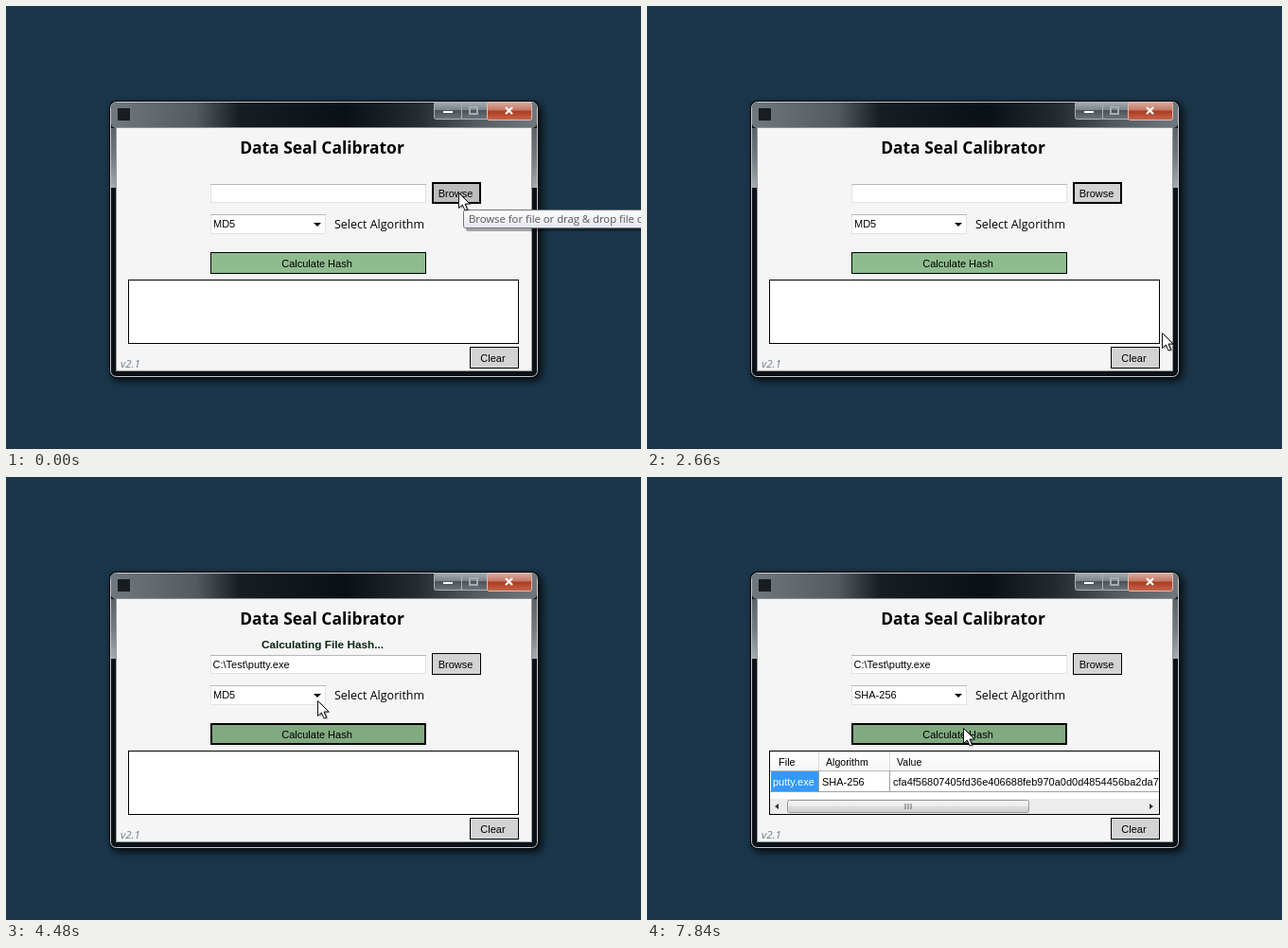
Recreate the animation shown at these times as an HTML page. Size 671 by 468 pixels, loop 8000 ms.

```html
<!DOCTYPE html>
<html lang="en">
<head>
<meta charset="utf-8">
<title>Checksum tool demo</title>
<style>
html, body { margin: 0; width: 100%; height: 100%; overflow: hidden; background: #1b364b; }
svg { display: block; width: 671px; height: 468px; }
text { font: 11px "Liberation Sans", Arial, sans-serif; fill: #000; white-space: pre; }
.ui { font: 11.3px "Open Sans", "Noto Sans", sans-serif; }
.label { font: 12.5px "Open Sans", "Noto Sans", sans-serif; }
.title { font: bold 17.4px "Open Sans", "Noto Sans", sans-serif; }
.status { font-weight: bold; font-size: 11.8px; fill: #07260f; }
.version { font: italic 11.5px "Open Sans", "Noto Sans", sans-serif; fill: #708090; }
.small { font-size: 10.6px; }
.tip { fill: #575757; }
.white { fill: #fff; }
.mid { text-anchor: middle; }
.end { text-anchor: end; }
.window { filter: drop-shadow(3px 3px 4px rgba(0,0,0,.85)); }
.glow { filter: blur(5px); }
</style>
</head>
<body>
<svg id="stage" viewBox="0 0 671 468" xmlns="http://www.w3.org/2000/svg"></svg>
<script>
const LOOP = 8000, STEP = 70;
const stage = document.getElementById('stage');

// Drawing helpers: boxes have their border inside the given size.
const rect = (x, y, w, h, fill, extra = '') =>
  `<rect x="${x}" y="${y}" width="${w}" height="${h}" fill="${fill}" ${extra}/>`;
const box = (x, y, w, h, fill, stroke, line = 1, r = 0, extra = '') =>
  rect(x + line / 2, y + line / 2, w - line, h - line, fill,
    `stroke="${stroke}" stroke-width="${line}" rx="${r}" ${extra}`);
const path = (d, fill, extra = '') => `<path d="${d}" fill="${fill}" ${extra}/>`;
const text = (x, y, s, cls = '') => `<text x="${x}" y="${y}" class="${cls}">${s}</text>`;
const group = (id, body, extra = '') => `<g id="${id}" ${extra}>${body}</g>`;
const down = (x, y, r = 4) => path(`M${x - r} ${y}h${2 * r}l${-r} ${r}z`, '#000');
const clip = (id, x, y, w, h) => `<clipPath id="${id}">${rect(x, y, w, h, '#000', `id="${id}Rect"`)}</clipPath>`;
const gradient = (id, stops, sideways) =>
  `<linearGradient id="${id}" x2="${sideways ? 1 : 0}" y2="${sideways ? 0 : 1}">` +
  stops.map(([at, color]) => `<stop offset="${at}" stop-color="${color}"/>`).join('') + '</linearGradient>';

const field = (x, y, w, h) => box(x, y, w, h, '#fff', '#e0e2e8') + rect(x, y, w, 1, '#b4b8be');

function closeButton(x, y) {
  return box(x, y, 48, 20, 'url(#red)', '#d8bcb5', 1, 2) +
    path(`M${x + 20} ${y + 6}l7 7m0 -7l-7 7`, 'none', 'stroke="#fff" stroke-width="2.2"');
}

function frame(x, y, w, h, top, shine) {
  const sideHeight = shine - y - top;
  return rect(x - 1, y - 1, w + 2, h + 2, '#05090c', 'rx="7"') +
    box(x, y, w, h, '#0b1116', '#c3cacf', 1, 6) +
    rect(x + 1, y + 1, w - 2, top - 1, 'url(#glass)', 'rx="5"') +
    [x + 1, x + w - 6].map(sx => rect(sx, y + top, 5, sideHeight, 'url(#side)')).join('') +
    box(x + 6, y + top - 1, w - 12, h - top - 5, '#f5f5f5', '#8b959b');
}

function scrollbar(x, y, w, thumbX, thumbW) {
  const cy = y + 8, cx = thumbX + thumbW / 2;
  return rect(x, y, w, 16, '#ececec') +
    box(thumbX, y + 1, thumbW, 14, 'url(#grey)', '#989898', 1, 2) +
    path(`M${x + 9} ${cy - 3}v6l-4 -3zM${x + w - 10} ${cy - 3}v6l4 -3z`, '#333') +
    path(`M${cx - 3} ${cy - 3}v6m3 -6v6m3 -6v6`, 'none', 'stroke="#666"');
}

const dialogButton = (y, label) =>
  box(536, y, 73, 21, 'url(#grey)', '#707070', 1, 3) + text(571.5, y + 15, label, 'mid');

const screen = (x, y, w, h) =>
  path(`M${x} ${y + 2}l${w} -2v${h}l${-w} -2z`, 'url(#deep)', 'stroke="#c3ccd5" stroke-width="1.6"') +
  path(`M${x + w * .3} ${y + h}l${w * .4} 1l3 4h${-w * .7}z`, '#b4bdc4');
const folder = (x, y, w, h) =>
  path(`M${x} ${y}h${w * .4}l2 2h${w * .6 - 2}v${h - 2}h${-w}z`, 'url(#yellow)', 'stroke="#d3a83f" stroke-width=".7"');

const hash = {
  md5: '9bb6826905965c13be1c84cc0ff83f42',
  sha: 'cfa4f56807405fd36e406688feb970a0d0d4854456ba2da72'
};

function table(id, algorithm, value, wide) {
  const lines = wide ? [181, 256] : [181, 256, 447];
  return group(id,
    rect(130, 290, 411, 20, 'url(#head)') + rect(130, 310, 411, 1, '#b5b5b5') + rect(130, 332, 411, 1, '#a0a0a0') +
    lines.map(x => rect(x, 291, 1, 19, '#dcdcdc') + rect(x, 310, 1, 23, '#a0a0a0')).join('') +
    rect(131, 311, 50, 21, '#3399ff') +
    text(139, 305, 'File') + text(189, 305, 'Algorithm', 'small') + text(264, 305, 'Value', 'small') +
    text(133, 326, 'putty.exe', 'white') + text(185, 326, algorithm) + text(260, 326, value) +
    (wide ? scrollbar(130, 340, 411, 148, 256) : text(455, 305, 'Path') + text(450, 326, 'C:\\Test\\putty.exe')),
    'clip-path="url(#tableClip)"');
}

const algorithms = ['MD5', 'SHA1', 'SHA-256', 'SHA-512'];

const defs = '<defs>' +
  gradient('glass', [[0, '#70787d'], [.2, '#535b61'], [.3, '#171e23'], [.55, '#0a1014'], [.72, '#252c31'], [.86, '#555d63'], [1, '#70787d']], true) +
  gradient('side', [[0, '#5b6369'], [.5, '#737b80'], [1, '#a5acb0']]) +
  gradient('red', [[0, '#d9aea3'], [.45, '#c47763'], [.5, '#ac3a22'], [1, '#c8684b']]) +
  gradient('caption', [[0, '#a7adb2'], [.45, '#7d858b'], [.5, '#4b5359'], [1, '#6d757b']]) +
  gradient('grey', [[0, '#f3f3f3'], [.48, '#ebebeb'], [.52, '#dddddd'], [1, '#cfcfcf']]) +
  gradient('blue', [[0, '#eaf6fd'], [.48, '#d9f0fc'], [.52, '#bee6fd'], [1, '#a7d9f5']]) +
  gradient('head', [[0, '#fff'], [1, '#f5f6f8']]) +
  gradient('sorted', [[0, '#f2f9fc'], [1, '#e1f1f9']]) +
  gradient('hot', [[0, '#fafbfd'], [1, '#ebf3fd']]) +
  gradient('picked', [[0, '#e4f0fd'], [1, '#cbe1fc']]) +
  gradient('screen', [[0, '#1d5fb4'], [.6, '#3f9be6'], [1, '#86ccf4']]) +
  gradient('deep', [[0, '#12257c'], [.6, '#1f50bb'], [1, '#5d9ae6']]) +
  gradient('yellow', [[0, '#fbe9a4'], [1, '#f0c65a']]) +
  gradient('hint', [[0, '#fff'], [1, '#e4e5f0']]) +
  clip('tableClip', 130, 290, 411, 66) + clip('listClip', 161, 75, 449, 238) + clip('dropClip', 210, 241, 140, 60) +
  '</defs>';

const mainWindow = group('main',
  frame(110, 101, 452, 291, 28, 192) +
  rect(118, 108, 13, 13, '#1a1d20') +
  box(452, 101, 30, 19, 'url(#caption)', '#aab1b5', 1, 2) + box(481, 101, 28, 19, 'url(#caption)', '#aab1b5') +
  box(461, 110, 12, 4, '#fff', '#555') + box(489, 106, 10, 9, 'none', '#a5acb0', 2) +
  closeButton(508, 101) +
  text(334, 156, 'Data Seal Calibrator', 'title mid') +
  group('status', text(334.5, 181, 'Calculating File Hash...', 'status mid')) +
  field(216, 188, 228, 20) + group('filePath', text(218.5, 202, 'C:\\Test\\putty.exe')) +
  rect(450, 186, 52, 23, '#d3d3d3', 'id="browse"') + box(450, 186, 52, 23, 'none', '#000') +
  group('browseFocus', box(450, 186, 52, 23, 'none', '#000', 2)) + text(475, 202, 'Browse', 'mid') +
  field(216, 220, 122, 21) +
  group('arrowHot', box(321, 220, 17, 21, 'url(#blue)', '#3c7fb1', 1, 1)) +
  down(329, 229) +
  group('textHot', rect(218, 223, 25, 15, '#3399ff', 'id="textHotRect"')) +
  '<text id="choice" x="219" y="234"></text>' +
  text(347, 235, 'Select Algorithm', 'label') +
  rect(216, 260, 228, 23, '#8fbc8f', 'id="calc"') + box(216, 260, 228, 23, 'none', '#000') +
  group('calcFocus', box(216, 260, 228, 23, 'none', '#000', 2)) + text(328.5, 276, 'Calculate Hash', 'mid') +
  box(129, 289, 413, 68, '#fff', '#000') +
  table('tableMd5', 'MD5', hash.md5, false) + table('tableSha', 'SHA-256', hash.sha, true) +
  box(490, 360, 52, 23, '#d3d3d3', '#000') + text(514.5, 376, 'Clear', 'mid') +
  text(121, 382, 'v2.1', 'version'), 'class="window"');

const dropdown = group('drop',
  rect(219, 244, 122, 54, '#0004') + box(216, 241, 122, 54, '#fff', '#444') +
  rect(217, 242, 120, 13, '#3399ff', 'id="pick"') +
  algorithms.map((name, i) => text(219, 252 + 13 * i, name, 'item')).join(''),
  'clip-path="url(#dropClip)"');

const tooltip = group('tooltip',
  rect(486, 218, 190, 20, '#0005', 'rx="2"') + box(483, 215, 200, 20, 'url(#hint)', '#767676', 1, 2) +
  text(489, 229, 'Browse for file or drag &amp; drop file onto form', 'ui tip'));

const places =
  box(98, 83, 20, 22, '#e4ebf0', '#98a7b2', 1, 2) + path('M101 88h13m-13 4h13m-13 4h8', 'none', 'stroke="#6797bb"') +
  path('M95 103h20l6 8h-25z', '#c4d3dc', 'stroke="#8b9ba5"') +
  `<circle cx="116" cy="103" r="7.5" fill="#d8e7ee" stroke="#6f8c9d"/>` + path('M116 98v5h4', 'none', 'stroke="#356"') +
  box(94, 145, 31, 24, 'url(#screen)', '#9eb7c9', 1, 1) + rect(95, 166, 29, 3, '#2c5379') +
  folder(95, 205, 15, 24) + folder(107, 206, 18, 24) +
  path('M94 220h32v13h-7v-6h-18v6h-7z', '#7fc3ec', 'stroke="#4791c4"') +
  box(96, 265, 10, 24, '#d5dbe0', '#8b969d') + screen(103, 264, 21, 21) +
  `<circle cx="107" cy="334" r="13" fill="#2a6fb8"/>` + path('M96 330q6 -12 15 -7l-4 8l-7 5z', '#66bd5c') +
  screen(106, 330, 19, 17) +
  [['Recent Places', 126], ['Desktop', 186], ['Libraries', 246], ['Computer', 306], ['Network', 366]]
    .map(([name, y]) => text(110, y, name, 'ui mid')).join('');

const toolbar =
  `<circle cx="444" cy="57" r="7.5" fill="#60666a" stroke="#3f4447"/>` +
  path('M448 57h-8m4 -4l-4 4l4 4', 'none', 'stroke="#fff" stroke-width="1.7"') +
  folder(460, 54, 13, 10) + path('M466 62v-9m-3 3l3 -4l3 4', 'none', 'stroke="#279327" stroke-width="2"') +
  folder(483, 54, 13, 10) + path('M494 49v8m-4 -4h8', 'none', 'stroke="#e6ad2f" stroke-width="1.5"') +
  box(506, 50, 15, 14, '#fff', '#316dbb') + rect(506, 50, 15, 3, '#316dbb') +
  [509, 513, 517].map(x => rect(x, 55, 2, 2, '#316dbb') + rect(x, 59, 2, 2, '#316dbb')).join('') + down(526, 55);

const fileList =
  box(160, 74, 451, 255, '#fff', '#e4e6e8') +
  `<g clip-path="url(#listClip)">` +
  rect(161, 97, 449, 1, '#d9e4ea') + box(160, 74, 272, 24, 'url(#sorted)', '#96d9f9') +
  rect(552, 75, 1, 23, '#dfe5e8') +
  rect(431, 98, 1, 215, '#f1f1f1') + rect(552, 98, 1, 215, '#f6f6f6') +
  path('M292 80l4 -4l4 4z', '#3c6f92') +
  text(166, 91, 'Name', 'ui') + text(438, 91, 'Date modified', 'ui') + text(558, 91, 'Type', 'ui') +
  group('rowHot', box(164, 99, 460, 19, 'url(#hot)', '#b8d6fb', 1, 2)) +
  group('rowPicked', box(164, 99, 460, 19, 'url(#picked)', '#7da2ce', 1, 2)) +
  rect(169, 102, 13, 13, '#555b82') +
  text(186, 113, 'putty.exe', 'ui') + text(437, 113, '9/13/2013 12:41 AM', 'ui') + text(558, 113, 'Application', 'ui') +
  '</g>' + scrollbar(161, 313, 449, 178, 314);

const dialog = group('dialog',
  frame(54, 10, 569, 421, 28, 134) + rect(61, 38, 555, 386, '#f0f0f0') +
  `<ellipse cx="96" cy="24" rx="22" ry="8" fill="#d3d9dd" class="glow"/>` +
  rect(62, 17, 13, 13, '#1a1d20') + text(82, 28, 'Open', 'ui') + closeButton(570, 10) +
  text(153, 61, 'Look in:', 'ui end') + field(160, 46, 261, 24) + folder(167, 51, 12, 14) +
  text(186, 62, 'Test', 'ui') + down(412, 57) + toolbar +
  rect(68, 76, 86, 337, '#f5f5f5') + places + fileList +
  text(162, 354, 'File name:', 'small') + text(162, 380, 'Files of type:', 'small') +
  field(256, 339, 246, 22) +
  group('nameHot', box(256, 339, 246, 22, 'none', '#5794bf') + rect(259, 343, 45, 15, '#3399ff')) +
  '<text id="fileName" x="260" y="354">putty.exe</text>' + down(493, 348) +
  box(256, 366, 246, 21, 'url(#grey)', '#777', 1, 2) + text(260, 381, 'All Files') + down(493, 375) +
  dialogButton(339, 'Open') + box(536, 339, 73, 21, 'none', '#3c7fb1', 1, 3) + box(537, 340, 71, 19, 'none', '#56cbf3', 1, 2) +
  group('openHot', box(536, 339, 73, 21, 'url(#blue)', '#3c7fb1', 1, 3) + text(571.5, 354, 'Open', 'mid')) +
  dialogButton(365, 'Cancel') + dialogButton(394, 'Help') +
  [[612, 414], [612, 418], [608, 418], [612, 422], [608, 422], [604, 422]].map(([x, y]) => rect(x, y, 2, 2, '#b5b5b5')).join(''),
  'class="window"');

const cursor = group('cursor',
  path('M.5 .5V16.5L4.3 13L7 19L9.5 18L7 12H12Z', '#0005', 'transform="translate(2 1)"') +
  path('M.5 .5V16.5L4.3 13L7 19L9.5 18L7 12H12Z', '#fff', 'stroke="#111"'));

stage.innerHTML = defs + rect(0, 0, 671, 468, '#1b364b') + mainWindow + dropdown + dialog + tooltip + cursor;

const part = {};
stage.querySelectorAll('[id]').forEach(el => part[el.id] = el);
const items = [...stage.querySelectorAll('.item')];

// Spans of time in which a part is visible.
const shown = {
  tooltip: [[0, 420]],
  filePath: [[2870, LOOP]],
  browseFocus: [[0, 3640]],
  calcFocus: [[3640, 5180], [7000, LOOP]],
  status: [[3850, 4690], [7070, 7770]],
  tableMd5: [[4690, 7770]],
  tableSha: [[7770, LOOP]],
  textHot: [[5180, 7000]],
  nameHot: [[0, 1330]],
  rowHot: [[1120, 1330]],
  rowPicked: [[1330, LOOP]],
  openHot: [[2100, LOOP]],
  drop: [[5180, 6230]]
};

// Pointer stops: time, x, y.
const stops = [
  [0, 478, 197], [840, 478, 197], [1050, 316, 118], [1190, 284, 107], [1680, 284, 107],
  [1960, 440, 250], [2100, 538, 340], [2170, 544, 345], [2800, 544, 345], [3010, 458, 306],
  [3290, 350, 272], [3430, 337, 262], [3990, 337, 262], [4410, 329, 237], [4830, 330, 233],
  [4900, 330, 232], [5530, 330, 232], [5950, 298, 270], [6090, 298, 271], [6650, 298, 271],
  [6860, 334, 265], [LOOP, 334, 265]
];

const within = (t, spans) => spans.some(([from, to]) => t >= from && t < to);
const ramp = (t, from, to) => Math.min(1, Math.max(0, (t - from) / (to - from)));

function pointer(t) {
  const i = Math.max(1, stops.findIndex(s => s[0] >= t));
  const [t0, x0, y0] = stops[i - 1], [t1, x1, y1] = stops[i];
  const k = ramp(t, t0, t1);
  return [Math.round(x0 + (x1 - x0) * k), Math.round(y0 + (y1 - y0) * k)];
}

function calcColor(t) {
  if (within(t, [[3640, 3710], [7000, 7070]])) return '#739873';
  return within(t, [[3290, 4690], [6230, LOOP]]) ? '#81aa80' : '#8fbc8f';
}

function draw(time) {
  const t = Math.floor(time / STEP) * STEP;
  for (const id in shown) part[id].style.display = within(t, shown[id]) ? '' : 'none';

  const [x, y] = pointer(t);
  part.cursor.setAttribute('transform', `translate(${x} ${y})`);

  const open = t < 2590 ? ramp(t, 280, 560) : 1 - ramp(t, 2520, 2660);
  const scale = .92 + .08 * open;
  part.dialog.style.display = open ? '' : 'none';
  part.dialog.style.opacity = open;
  part.dialog.setAttribute('transform', `translate(338 220) scale(${scale}) translate(-338 -220)`);
  part.fileName.setAttribute('class', t < 1330 ? 'white' : '');

  part.browse.setAttribute('fill', t < 350 ? '#bdbdbd' : '#d3d3d3');
  part.calc.setAttribute('fill', calcColor(t));

  part.choice.textContent = algorithms[t < 6230 ? 0 : 2];
  part.choice.setAttribute('class', within(t, shown.textHot) ? 'white' : '');
  part.textHotRect.setAttribute('width', t < 6230 ? 25 : 45);
  part.arrowHot.style.opacity = ramp(t, 4620, 4830) * (1 - ramp(t, 6160, 6580));

  const hover = Math.max(0, Math.floor((y - 242) / 13));
  part.pick.setAttribute('y', 242 + 13 * hover);
  items.forEach((item, i) => item.style.fill = i === hover ? '#fff' : '');
  part.dropClipRect.setAttribute('height', 60 * ramp(t, 5110, 5320));
}

function tick() {
  draw(performance.now() % LOOP);
  requestAnimationFrame(tick);
}
tick();
</script>
</body>
</html>
```
